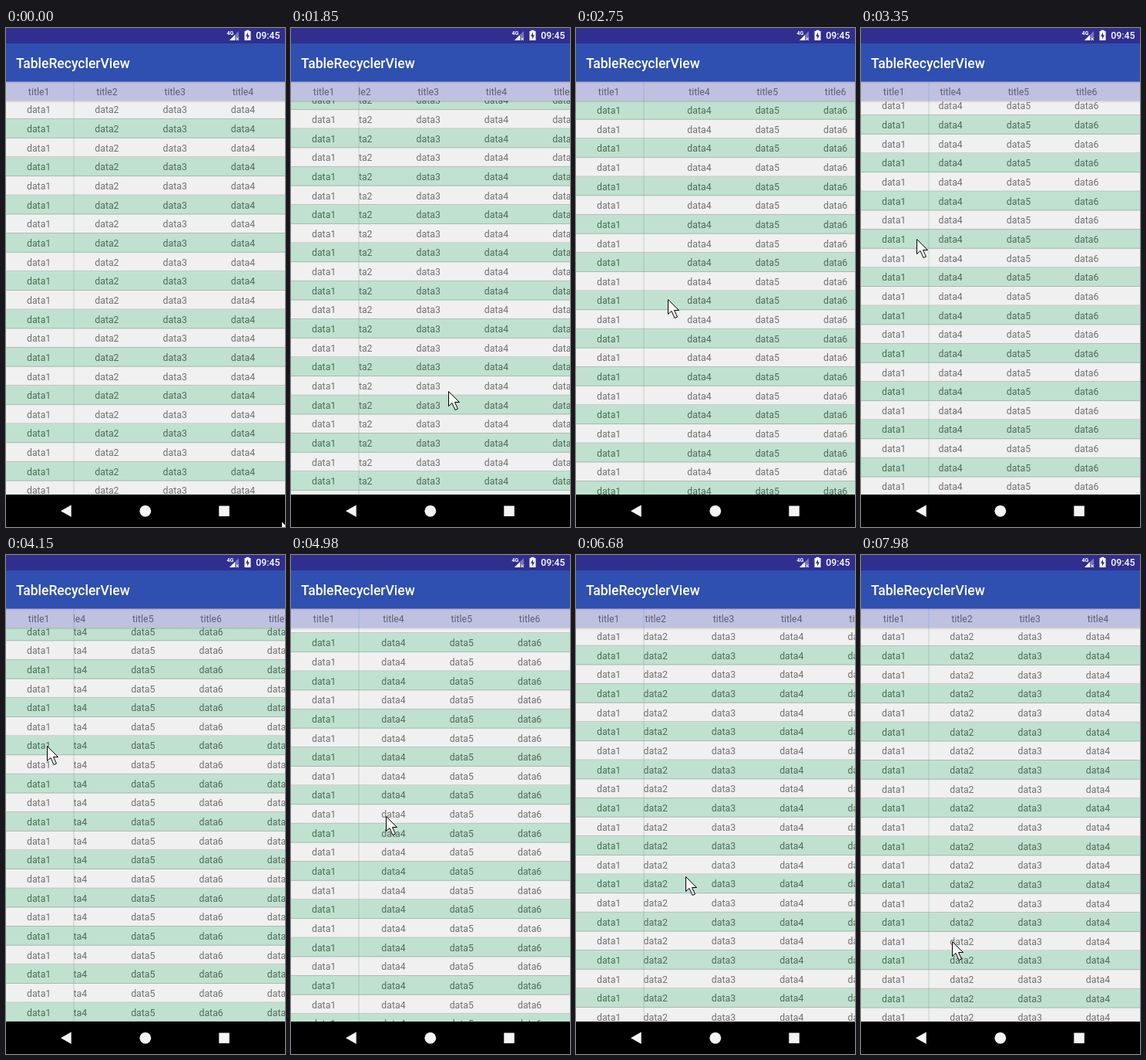
An HTML page with a canvas for the animation above (8 s loop, 362 by 646 pixels).

```html
<!DOCTYPE html>
<html lang="en">
<head>
<meta charset="utf-8">
<title>Scrolling table</title>
<style>
  html, body { margin: 0; width: 362px; height: 646px; overflow: hidden; background: #000; }
  canvas { display: block; }
</style>
</head>
<body>
<canvas id="stage" width="362" height="646"></canvas>
<script>
const ctx = document.getElementById('stage').getContext('2d');
const LOOP = 8000, COL = 88.3, ROW = 24.65, TOP = 93.5, BOTTOM = 604, W = 362;

// Key points: time, x, y. Each stretch is one steady drag or pause.
const scrollPath = [
  [1150, 0, 0], [1850, 41, 36.8], [2750, 147.5, 172], [3550, 206, 278], [4150, 218, 278],
  [4480, 218, 278], [4980, 174.5, 214], [5780, 90, 99], [7080, 0, 99], [7980, 0, 0]
];
const pointerPath = [
  [0, 357, 638], [1850, 204, 470], [2750, 119, 351], [3550, 56, 247], [4150, 53, 247],
  [4980, 123, 338], [5780, 195, 449], [7080, 118, 401], [7980, 118, 500]
];

const arrow = new Path2D('M0 0V19L4.5 15L8.5 24L12 22.5L8 14H14Z');
const signalArea = new Path2D('M302 4V16H290Z');
const signalLevel = new Path2D('M297 9V16H290Z');
const signalCross = new Path2D('M298.5 12.5L302 16M302 12.5L298.5 16');
const battery = new Path2D('M309.5 4H311.5V2.7H315.5V4H317.5V16H309.5Z');
const bolt = new Path2D('M314 5.5L311 10.8H313V14.5L316 9.2H314Z');
const backKey = new Path2D('M71 625.3L84.7 617.6V633Z');

function along(path, t) {
  const next = path.findIndex(p => p[0] > t);
  if (next < 1) return path.at(next).slice(1);
  const [t0, x0, y0] = path[next - 1], [t1, x1, y1] = path[next];
  const p = (t - t0) / (t1 - t0);
  return [x0 + (x1 - x0) * p, y0 + (y1 - y0) * p];
}

// The picture advances in steps of 100 ms.
function step(t) {
  const offset = t < 4480 ? 50 : 80;
  return Math.floor((t - offset) / 100) * 100 + offset;
}

function rect(color, x, y, w, h) {
  ctx.fillStyle = color;
  ctx.fillRect(x, y, w, h);
}

function fill(color, path) {
  ctx.fillStyle = color;
  ctx.fill(path);
}

function stroke(color, path) {
  ctx.strokeStyle = color;
  ctx.stroke(path);
}

function text(str, x, y, color, font = '12.32px', align = 'center') {
  ctx.font = font + ' Roboto, sans-serif';
  ctx.textAlign = align;
  ctx.fillStyle = color;
  ctx.fillText(str, x, y);
}

function shade(y, h, alpha) {
  const g = ctx.createLinearGradient(0, y, 0, y + h);
  g.addColorStop(0, `rgba(0,0,0,${alpha})`);
  g.addColorStop(1, 'rgba(0,0,0,0)');
  rect(g, 0, y, W, h);
}

function clipped(x, y, w, h, draw) {
  ctx.save();
  ctx.beginPath();
  ctx.rect(x, y, w, h);
  ctx.clip();
  draw();
  ctx.restore();
}

// The first column stays put; the others slide beneath it.
function cells(label, sx, y, color, firstColor = color) {
  text(label + 1, 42.6, y, firstColor);
  clipped(88, 0, W - 88, BOTTOM, () => {
    for (let c = 1; c < 9; c++) text(label + (c + 1), 42.6 + c * COL - sx, y, color);
  });
}

function row(r, sx, sy) {
  const y = TOP + r * ROW - sy, green = r % 2;
  if (green) rect('#c0e1d0', 0, y, W, ROW);
  rect('#a9b5ae', 0, y + ROW - 1, W, .9);
  if (green) cells('data', sx, y + 16.9, '#50695b', '#43704f');
  else cells('data', sx, y + 16.9, '#707070');
}

function table(sx, sy) {
  rect('#f0f0f0', 0, TOP, W, BOTTOM - TOP);
  clipped(0, 94, W, BOTTOM - 94, () => {
    const first = Math.floor(sy / ROW);
    for (let r = first; r < first + 23; r++) row(r, sx, sy);
    rect('rgba(125,165,140,.28)', 87.3, 94, 1.5, BOTTOM);
  });
  rect('#c0c0e0', 0, 69, W, 25);
  cells('title', sx, 86.6, '#5d5d73');
  rect('rgba(110,150,220,.25)', 87.3, 69, 1.5, 25);
  shade(69, 3, .12);
  shade(94, 3, .16);
}

function statusBar() {
  rect('#302f90', 0, 0, W, 20);
  text('4G', 286.5, 8.5, '#fff', '700 7px', 'left');
  fill('rgba(255,255,255,.35)', signalArea);
  fill('#fff', signalLevel);
  stroke('#fff', signalCross);
  fill('#fff', battery);
  fill('#302f90', bolt);
  text('09:45', 355.5, 14, '#fff', '500 12.32px', 'right');
}

function titleBar() {
  rect('#2f50b0', 0, 20, W, 49.5);
  text('TableRecyclerView', 13, 51.7, '#fff', '500 17.5px', 'left');
}

function navigationBar() {
  rect('#000', 0, BOTTOM, W, 42);
  fill('#f4f4f4', backKey);
  ctx.beginPath();
  ctx.arc(180.8, 625.3, 7.4, 0, 7);
  ctx.fill();
  rect('#f4f4f4', 276.3, 618.6, 13.5, 13.5);
}

function pointer(x, y) {
  ctx.save();
  ctx.translate(Math.round(x) + .5, Math.round(y) + .5);
  fill('#f6f6f6', arrow);
  stroke('#000', arrow);
  ctx.restore();
}

function frame(now) {
  const t = step(now % LOOP);
  table(...along(scrollPath, t));
  statusBar();
  titleBar();
  navigationBar();
  pointer(...along(pointerPath, t));
  requestAnimationFrame(frame);
}
requestAnimationFrame(frame);
</script>
</body>
</html>
```
